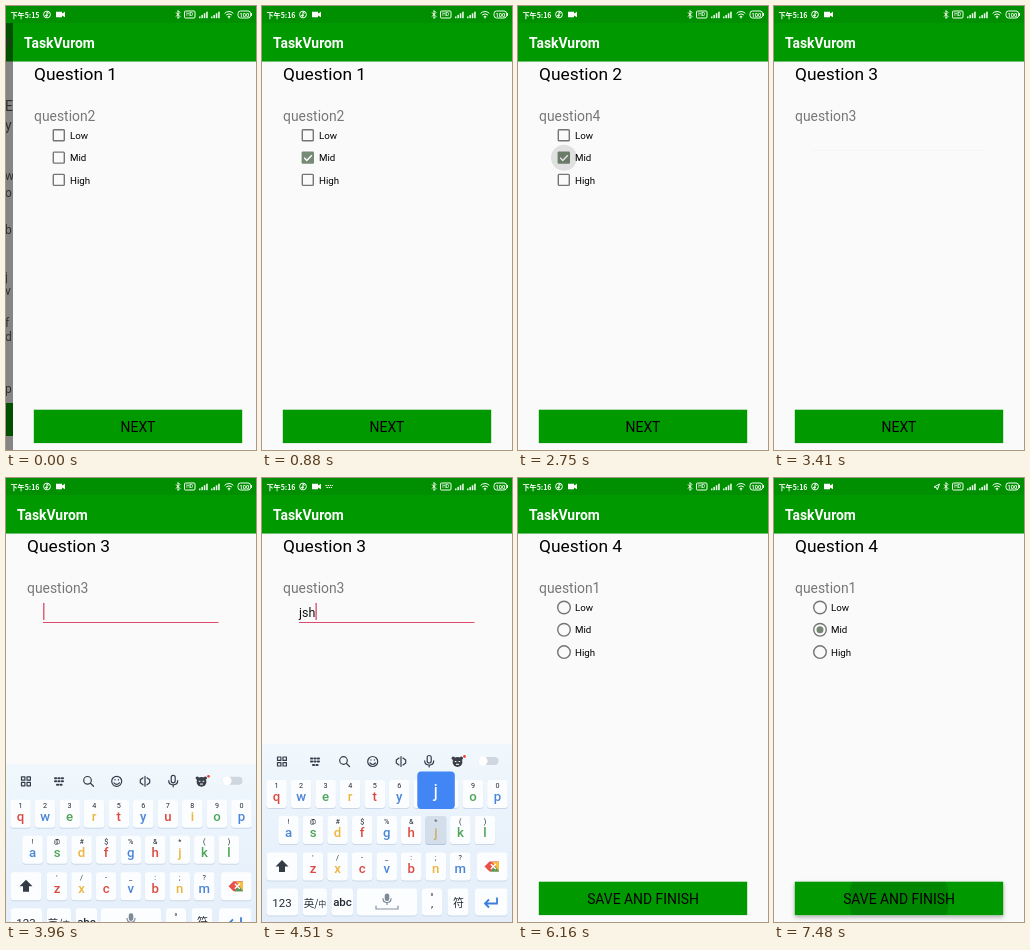
An HTML page that plays this animation: 250 by 444 pixels, repeating every 7590 ms.

```html
<!DOCTYPE html>
<html lang="en">
<head>
<meta charset="utf-8">
<title>Survey form</title>
<style>
  html, body { margin: 0; width: 100%; height: 100%; overflow: hidden; background: #fafafa; }
  svg { display: block; width: 100%; height: 100%; }
  text { font-family: Roboto, "Noto Sans CJK SC", sans-serif; white-space: pre; }
  .cjk { font-family: "Noto Sans CJK SC", "Noto Sans CJK", sans-serif; }
  .mid { text-anchor: middle; }
  .line { fill: none; stroke: #343e4a; stroke-width: 1.2; stroke-linecap: round; stroke-linejoin: round; }
  .thin { fill: none; stroke: #f4fff4; stroke-width: 1; }
</style>
</head>
<body>
<svg viewBox="0 0 250 444" preserveAspectRatio="none">
  <defs>
    <linearGradient id="board" x2="0" y2="1">
      <stop stop-color="#f1f8fd"/><stop offset=".3" stop-color="#ebf4fc"/><stop offset="1" stop-color="#e4eefa"/>
    </linearGradient>
    <filter id="lift" x="-10%" y="-30%" width="120%" height="170%">
      <feDropShadow dx="0" dy="2" stdDeviation="2" flood-opacity=".32"/>
    </filter>
    <clipPath id="buttonClip"><rect x="20.8" y="403.7" width="208.4" height="33.4"/></clipPath>
  </defs>

  <g id="under">
    <rect width="10" height="444" fill="#858585"/>
    <rect y="17" width="10" height="38.5" fill="#005000"/>
    <rect y="397" width="10" height="33" fill="#005000"/>
    <g id="scraps" fill="#303030"></g>
  </g>

  <g id="page">
    <rect width="250" height="444" fill="#fafafa"/>
    <rect y="17" width="250" height="38.55" fill="#009900"/>
    <text x="11" y="41.5" font-size="13.9" font-weight="600" fill="#fff">TaskVurom</text>
    <text id="heading" x="21" y="74.3" font-size="17.36"></text>
    <text id="prompt" x="21" y="114.5" font-size="13.9" fill="#777"></text>
    <g id="choices"></g>
    <circle id="touch" cx="46" r="13" fill="#000" opacity=".1"/>
    <g id="field">
      <rect id="rule" x="37" y="144" width="175.5" height="1"/>
      <text id="typed" x="37" y="139.3" font-size="12.5" fill="#111"></text>
      <rect id="caret" y="125" width="1.2" height="17" fill="#d83a62"/>
    </g>
    <rect id="button" x="20.8" y="403.7" width="208.4" height="33.4" fill="#009900"/>
    <g clip-path="url(#buttonClip)"><circle id="ripple" cx="125" cy="421" fill="#000" opacity=".12"/></g>
    <text id="action" class="mid" x="125" y="426" font-size="13.9"></text>
  </g>

  <g id="status">
    <rect width="250" height="17" fill="#008f00"/>
    <text id="clock" class="cjk" x="4.5" y="11.5" font-size="7.1" font-weight="700" fill="#fff"></text>
    <circle class="thin" cx="41" cy="8.5" r="3.4"/>
    <path class="thin" d="M41 10V6.2l1.8 1"/><circle cx="40.4" cy="9.6" r="1.2" fill="#f4fff4"/>
    <path d="M50 5.8h6v1.7l3-1.8v5.6l-3-1.8v1.7h-6z" fill="#fff"/>
    <g id="imeIcon"><path class="thin" d="M63.5 7.5h7.5M64.5 9.5h5.5" stroke-dasharray="1.4 .8"/></g>
    <path id="location" class="thin" d="M160 9l5.5-3-2.2 5.8-.9-2.3z"/>
    <path class="thin" d="M170 6.5l4 4-2 2v-8l2 2-4 4"/>
    <rect class="thin" x="178.5" y="5" width="10.5" height="7" rx="1"/>
    <text class="mid" x="183.7" y="10.3" font-size="5" font-weight="500" fill="#f4fff4">HD</text>
    <g id="signals" fill="#f4fff4"></g>
    <path class="thin" d="M218.6 7.3q4.4-3.6 8.8 0M220.1 9q2.9-2.3 5.8 0M221.6 10.7q1.4-1 2.8 0"/>
    <circle cx="223" cy="11.8" r=".8" fill="#fff"/>
    <rect class="thin" x="232" y="5" width="12.6" height="7" rx="2.6"/><path d="M245 7h1v3h-1z" fill="#f4fff4"/>
    <text class="mid" x="238.3" y="10.5" font-size="5.6" font-weight="700" fill="#fff">100</text>
  </g>

  <g id="keyboard">
    <rect y="266" width="250" height="178" fill="url(#board)"/>
    <g class="line">
      <path d="M15.5 279h3.4v3.4h-3.4zM21 279h3.4v3.4H21zM15.5 284.6h3.4v3.4h-3.4zM21 284.6h3.4v3.4H21z"/>
      <path d="M49 280.5h10M49 283.5h10M51 287h6" stroke-width="2" stroke-dasharray="1.2 2.2"/>
      <circle cx="81.5" cy="282.5" r="3.8"/><path d="M84.5 285.5l3 3"/>
      <circle cx="110.7" cy="283.5" r="5"/><path d="M108 285q2.7 3 5.4 0M109 281.8v.3M112.4 281.8v.3"/>
      <path d="M139 278.5v10M137 280l-2.7 2v3l2.7 2M141 280l2.7 2v3l-2.7 2"/>
      <rect x="165.2" y="277.5" width="4" height="7.5" rx="2"/><path d="M162.7 282.8q0 4.3 4.5 4.3t4.5-4.3M167.2 287v2"/>
    </g>
    <circle cx="195.5" cy="284" r="4.9" fill="#3a3f49"/>
    <circle cx="191.3" cy="280.3" r="1.7" fill="#3a3f49"/><circle cx="199.3" cy="280.3" r="1.7" fill="#3a3f49"/>
    <path d="M192.8 283.5h1.6M196.6 283.5h1.6M194 286.3h3" stroke="#fff"/>
    <circle cx="202.5" cy="278.5" r="1.4" fill="#f04438"/>
    <rect id="track" x="216.5" y="279" width="20" height="8" rx="4"/><circle id="knob" cy="283" r="4.6"/>
    <g id="keys"></g>
    <path d="M20 382l6.5 6.5H23v5.5h-6v-5.5h-3.5z" fill="#333b47"/>
    <path d="M222.5 388.5l5-5h9.5v10h-9.5z" fill="#e8504a"/>
    <path d="M230 384l7 9.5v-9.5z" fill="#f5bf3d"/><path d="M228.5 393.5l4.5-5 4 5z" fill="#45a45a"/>
    <path d="M228.8 386l5 5M233.8 386l-5 5" stroke="#fff" stroke-width="1.3"/>
    <g class="line"><path d="M114 428v3h22v-3" stroke="#8592a2"/><rect x="123.3" y="416" width="3.4" height="6.5" rx="1.7" fill="#7d8896" stroke="#7d8896"/><path d="M121 420.5q0 4 4 4t4-4M125 424.5v2" stroke="#7d8896"/></g>
    <path d="M235 419.5v6h-12m4-4l-4 4 4 4" fill="none" stroke="#3d7edb" stroke-width="1.8"/>
    <g id="popup">
      <rect id="pressed" y="338" width="21" height="29" rx="3" fill="#8aa6c6" opacity=".36"/>
      <rect id="bubble" width="37.5" height="37.5" rx="4" fill="#4285f4"/>
      <text id="bubbleText" class="mid" font-size="19" fill="#fff"></text>
    </g>
  </g>
</svg>
<script>
const LOOP = 7590, STEP = 110;
const RED = "#db4a40", BLUE = "#4a86d8", GOLD = "#eeb53c", GREEN = "#4da457";
const $ = id => document.getElementById(id);
const set = (id, attrs) => { for (const name in attrs) $(id).setAttribute(name, attrs[name]); };
const show = (id, on) => { $(id).style.display = on ? "" : "none"; };
const clamp = v => Math.max(0, Math.min(1, v));
const ease = v => 1 - (1 - clamp(v)) ** 2;
const centred = (x, y, size, text, fill = "#222a34", extra = "") =>
  `<text class="mid" x="${x}" y="${y}" font-size="${size}" fill="${fill}" ${extra}>${text}</text>`;

// Underlying screen and signal bars
$("scraps").innerHTML = [["n", 41], ["E", 105], ["y", 124], ["w", 174], ["o", 191], ["b", 228],
  ["j", 275], ["v", 289], ["f", 321], ["d", 335], ["p", 387]]
  .map(([s, y], i) => `<text x="-1" y="${y}" font-size="${i < 3 ? 14 : 12}">${s}</text>`).join("");
$("signals").innerHTML = [193, 205].map(x => [0, 1, 2, 3].map(i =>
  `<rect x="${x + i * 2.4}" y="${10.5 - i * 1.6}" width="1.5" height="${1.7 + i * 1.6}"/>`).join("")).join("");

// Keyboard
const keyAt = {};
const keyBox = (x, y, w, h = 28) =>
  `<rect x="${x}" y="${y + 1}" width="${w}" height="${h}" rx="3.2" fill="#c9d7e8"/>` +
  `<rect x="${x}" y="${y}" width="${w}" height="${h}" rx="3.2" fill="#fcfdff"/>`;
const letterRow = (letters, marks, colors, first, y) => [...letters].map((c, i) => {
  const x = first + i * 24.55;
  keyAt[c] = { x, y };
  return keyBox(x - 10.3, y, 20.6) + centred(x, y + 7.8, 7.2, marks[i]) +
    centred(x, y + 20.8, 13.2, c, colors[i], 'font-weight="500"');
}).join("");
$("keys").innerHTML =
  letterRow("qwertyuiop", "1234567890", [RED, BLUE, GREEN, GOLD, RED, BLUE, RED, GOLD, GREEN, BLUE], 14.5, 302) +
  letterRow("asdfghjkl", "!@#$%&*()", [BLUE, GREEN, GOLD, RED, BLUE, RED, GOLD, GREEN, GREEN], 26.5, 338) +
  letterRow("zxcvbnm", "'/-_:;?", [RED, GOLD, RED, BLUE, RED, GOLD, BLUE], 51, 374.5) +
  keyBox(4.5, 374.5, 31) + keyBox(215, 374.5, 30.5) +
  [[4.5, 31.5], [41, 24], [69.5, 21.5], [95, 60], [160, 20], [185.5, 21], [213, 32.5]]
    .map(([x, w]) => keyBox(x, 410.5, w, 27)).join("") +
  centred(20, 429, 11.5, "123") +
  centred(53, 429, 10.5, '英/<tspan font-size="8">中</tspan>', "#222a34", 'style="font-family:\'Noto Sans CJK SC\',sans-serif"') +
  centred(80.5, 428, 11.5, "abc", "#222a34", 'font-weight="500"') +
  centred(170, 422, 9, "°") + centred(170, 428.5, 11, ",") +
  centred(196.5, 428.5, 11, "符");

// Script of the session: each entry holds from its time on
const at = (list, t) => list.filter(e => e[0] <= t).pop();
const pages = [
  [0, "Question 1", "question2", "box"],
  [1430, "Question 2", "question4", "box"],
  [3190, "Question 3", "question3", "text"],
  [5940, "Question 4", "question1", "radio"]
];
const picks = [[0, -1], [550, 1], [1430, -1], [2640, 1], [3190, -1], [6930, 1]];
const touches = [[440, 1], [2530, 1], [6710, 1]];
const presses = [1100, 2860, 5830, 7370];
const typing = [[0, "", ""], [4180, "", "j"], [4290, "j", "s"], [4400, "js", "h"], [4510, "jsh", "j"],
  [4620, "jshhj", "b"], [4730, "jshhjb", "h"], [4840, "jshhjbh", "d"], [4950, "jshhjbhd", "d"],
  [5060, "jshhjbhdd", ""]];

const rowY = i => 129.5 + i * 22.3;
function choice(kind, label, i, on) {
  const y = rowY(i);
  const box = on
    ? `<rect x="39.6" y="${y - 6.4}" width="12.4" height="12.4" rx="1.3" fill="#768a76"/>
       <path d="M42.2 ${y}l2.6 2.6 5-5.2" fill="none" stroke="#fff" stroke-width="1.4"/>`
    : `<rect x="40.3" y="${y - 5.7}" width="11" height="11" rx=".8" fill="none" stroke="#757575" stroke-width="1.4"/>`;
  const radio = `<circle cx="46" cy="${y}" r="6.3" fill="none" stroke="#757575" stroke-width="1.4"/>` +
    (on ? `<circle cx="46" cy="${y}" r="3.5" fill="#758875"/>` : "");
  return (kind === "box" ? box : radio) +
    `<text x="57" y="${y + 3.6}" font-size="9.72">${label}</text>`;
}

let lastChoices = "";
function render(t) {
  const [, heading, prompt, kind] = at(pages, t);
  const [, picked] = at(picks, t);
  const [, typed, key] = at(typing, t);

  set("page", { transform: `translate(${t < STEP ? 7 : 0} 0)` });
  show("under", t < STEP);
  $("clock").textContent = t < 770 ? "下午5:15" : "下午5:16";
  show("imeIcon", t >= 4070 && t < 4950);
  show("location", t >= 7150);
  $("heading").textContent = heading;
  $("prompt").textContent = prompt;
  $("action").textContent = kind === "radio" ? "SAVE AND FINISH" : "NEXT";

  const markup = kind === "text" ? "" :
    ["Low", "Mid", "High"].map((label, i) => choice(kind, label, i, i === picked)).join("");
  if (markup !== lastChoices) $("choices").innerHTML = lastChoices = markup;

  const touch = touches.find(([start]) => t >= start && t < start + 330);
  show("touch", touch);
  if (touch) set("touch", { cy: rowY(touch[1]), r: 6 + 7 * ease((t - touch[0]) / 220) });

  const press = presses.find(start => t >= start && t < start + 330);
  const pressed = press !== undefined && !(kind === "radio" && press < 5940);
  set("ripple", { r: pressed ? (t - press) / 330 * 150 : 0 });
  if (pressed) set("button", { filter: "url(#lift)" });
  else $("button").removeAttribute("filter");

  const focused = t >= 3740;
  show("field", kind === "text");
  set("rule", { fill: focused ? "#dc4a6e" : "#f5f5f5" });
  $("typed").textContent = typed;
  show("caret", focused && t < 5500);
  if (kind === "text") set("caret", { x: 37.2 + (typed ? $("typed").getComputedTextLength() : 0) });

  const raised = t < 5280 ? ease((t - 3740) / 330) : 1 - ease((t - 5170) / 330);
  show("keyboard", raised > 0);
  set("keyboard", { transform: `translate(0 ${178 * (1 - raised)})` });
  const active = t >= 4840;
  set("track", { fill: active ? "#4f83cf" : "#cfd6df" });
  set("knob", { cx: active ? 232 : 221, fill: active ? "#dce9fb" : "#fff" });

  show("popup", key);
  if (key) {
    const { x, y } = keyAt[key];
    set("pressed", { x: x - 10.5, y });
    set("bubble", { x: x - 18.5, y: y - 44.5 });
    set("bubbleText", { x, y: y - 19.5 });
    $("bubbleText").textContent = key;
  }
}

const start = performance.now();
function tick() {
  const t = (performance.now() - start) % LOOP;
  render(Math.floor(t / STEP) * STEP);
  requestAnimationFrame(tick);
}
tick();
</script>
</body>
</html>
```
